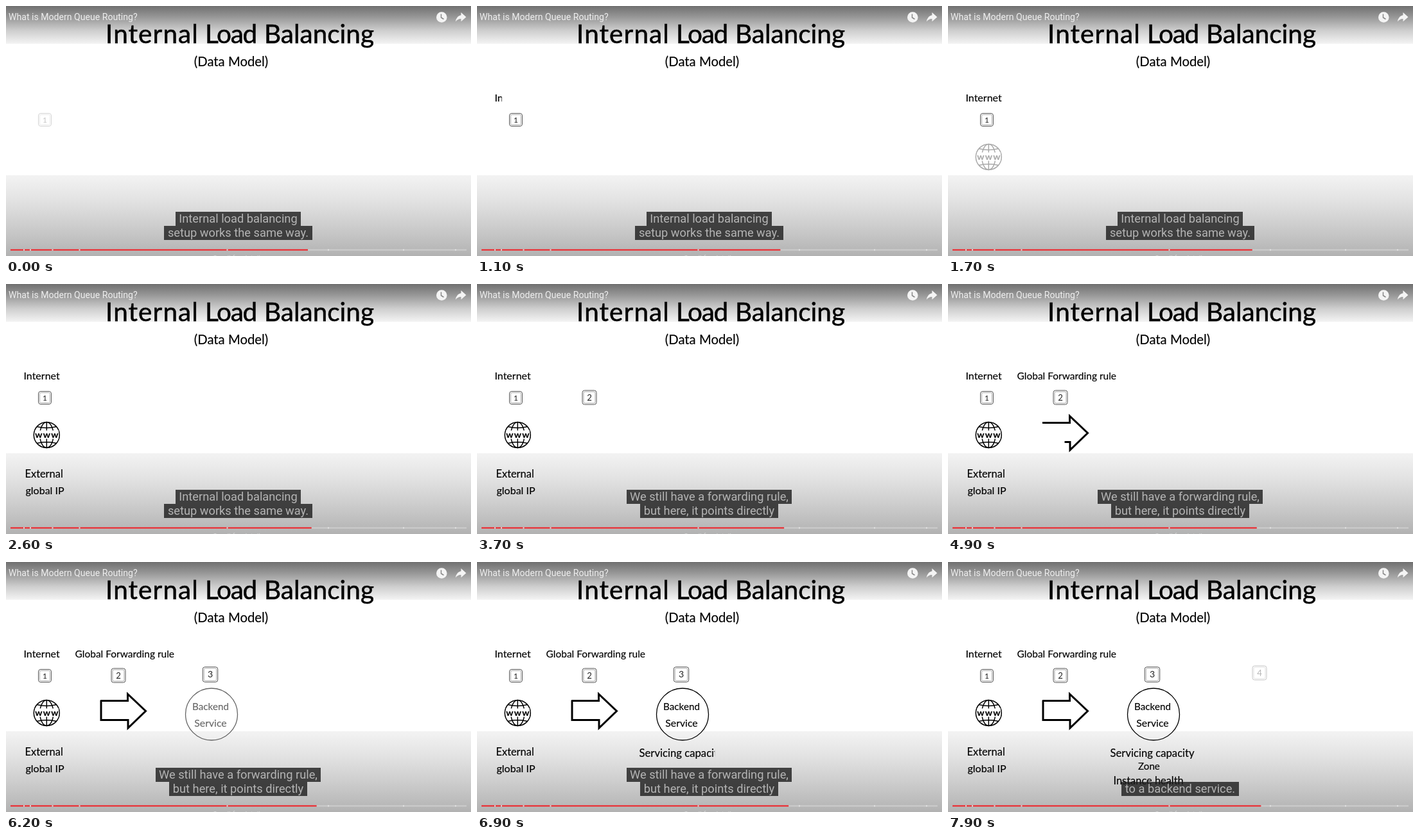
These frames come from a looping animation (724x390 px, 8 s). An HTML page:

```html
<!DOCTYPE html>
<html lang="en">
<head>
<meta charset="utf-8">
<title>Internal Load Balancing</title>
<style>
  html, body { margin: 0; width: 100%; height: 100%; overflow: hidden; background: #fff; }
  svg { position: absolute; left: 0; top: 0; }
  .hand { font-family: Lato, sans-serif; fill: #000; stroke: #000; stroke-width: .15; }
  .big { stroke-width: .5; }
  .ui { font-family: Roboto, sans-serif; }
  .line { fill: none; stroke: #000; }
  #caption {
    position: absolute; left: 0; top: 321px; width: 723px; height: 44px;
    display: flex; flex-direction: column; align-items: center; justify-content: flex-end;
    font: 18.25px/22px Roboto, sans-serif; color: #b4b4b4; white-space: pre;
  }
  #caption span { background: rgba(28, 28, 28, .8); padding: 0 5.5px; }
</style>
</head>
<body>
<svg id="stage" width="724" height="390" viewBox="0 0 724 390">
  <defs>
    <linearGradient id="top" x2="0" y2="1">
      <stop offset="0" stop-color="#707070"/>
      <stop offset=".3" stop-color="#989898"/>
      <stop offset=".65" stop-color="#cecece"/>
      <stop offset="1" stop-color="#f4f4f4"/>
    </linearGradient>
    <linearGradient id="bottom" x2="0" y2="1">
      <stop offset="0" stop-color="#f3f3f3"/>
      <stop offset=".3" stop-color="#e3e3e3"/>
      <stop offset=".6" stop-color="#cfcfcf"/>
      <stop offset="1" stop-color="#b2b2b2"/>
    </linearGradient>
  </defs>
  <rect width="724" height="59" fill="url(#top)"/>
  <rect y="264" width="724" height="126" fill="url(#bottom)"/>

  <g class="hand big" font-size="40.5">
    <text x="155" y="58" letter-spacing="1.1">Internal</text>
    <text x="310" y="58" letter-spacing="-1.3">Load</text>
    <text x="402" y="58">Balancing</text>
  </g>
  <text class="hand" x="350.5" y="94" font-size="20.3" text-anchor="middle">(Data Model)</text>

  <g id="board"></g>

  <g id="globe" class="line" stroke-width="1.5">
    <circle cx="63.3" cy="235.5" r="20"/>
    <ellipse cx="63.3" cy="235.5" rx="10.5" ry="20"/>
    <path d="M63.3 215.5v40M48 222.5q15.3 4 30.6 0M48 248.5q15.3 -4 30.6 0"/>
    <rect x="45" y="228.5" width="37" height="13" fill="#fff" stroke="none"/>
    <text class="hand" x="64" y="239.5" font-size="14" font-weight="700"
      letter-spacing="1.2" text-anchor="middle">www</text>
  </g>

  <path id="arrow" class="line" stroke-width="3" pathLength="1" stroke-dasharray="1 2"
    d="M147 216.5H189.5V206L217.5 232.5L190 259V246.5H148V216"/>

  <g id="service">
    <circle class="line" cx="320" cy="237.5" r="40.5" stroke-width="1.3"/>
    <g class="hand" text-anchor="middle">
      <text x="318.5" y="231" font-size="15.2">Backend</text>
      <text x="318.5" y="257" font-size="15.8">Service</text>
    </g>
  </g>

  <g class="ui">
    <text x="4" y="22" font-size="14.1" fill="#eee">What is Modern Queue Routing?</text>
    <text x="362" y="397" font-size="11" fill="#fff" opacity=".5" text-anchor="middle">Scroll for details</text>
  </g>
  <circle cx="678.3" cy="17.5" r="8.3" fill="#f4f4f4"/>
  <path d="M677.5 12.5v5.5l4 2.5" fill="none" stroke="#888" stroke-width="1.5"/>
  <path d="M708.5 10l8 7.2l-8 7v-4.2q-5.5 0 -8.5 4.5q1 -9 8.5 -10.3z" fill="#f4f4f4"/>

  <rect x="7" y="379.5" width="710" height="2" fill="#cdcdcd"/>
  <rect id="played" x="7" y="379.5" height="2" fill="#ee1c22"/>
  <g id="gaps" fill="#e4e4e4"></g>
</svg>
<div id="caption"></div>

<script>
const LOOP = 8000, STEP = 100;
const $ = id => document.getElementById(id);
const ramp = (t, from, to) => Math.min(1, Math.max(0, (t - from) / (to - from)));

function add(parent, tag, attrs, text = '') {
  const el = document.createElementNS('http://www.w3.org/2000/svg', tag);
  for (const k in attrs) el.setAttribute(k, attrs[k]);
  el.textContent = text;
  return parent.appendChild(el);
}

// text, x, baseline, size, writing start, writing end
const labels = [
  ['Internet', 27.5, 149, 16, 1000, 1500],
  ['External', 29.5, 302, 16.4, 1900, 2250],
  ['global IP', 30.5, 328, 16, 2250, 2600],
  ['Global Forwarding rule', 107.5, 149, 15.5, 3700, 4450],
  ['Servicing capacity', 252.5, 304, 16.7, 6480, 6950],
  ['Zone', 296, 324, 15.2, 6950, 7100],
  ['Instance health', 257.5, 347, 16.4, 7100, 7450]
].map(([text, x, y, size, from, to]) => ({
  from, to, el: add($('board'), 'text', { class: 'hand', x, y, 'font-size': size }, text)
}));

// centre x, centre y, side, fade start, fade end, least opacity
const keys = [
  [60.5, 177.5, 20, 400, 900, .25],
  [175, 177, 22, 3150, 3700, 0],
  [318, 175.5, 23.5, 5500, 5900, 0],
  [485, 173, 22, 7700, 8300, 0]
].map(([x, y, side, from, to, least], i) => {
  const el = add($('board'), 'g', {});
  const box = (s, rx, stroke) => add(el, 'rect',
    { x: x - s / 2, y: y - s / 2, width: s, height: s, rx, fill: '#fff', stroke });
  box(side, 3.5, '#555');
  box(side - 4, 2, '#aaa');
  add(el, 'text', { x, y: y + 4.6, 'font-family': 'Lato, sans-serif', 'font-size': side * .6,
    fill: '#222', 'text-anchor': 'middle' }, i + 1);
  return { el, from, to, least };
});

for (const x of [27, 37, 71.5, 113.5, 343.5, 501, 618, 699])
  add($('gaps'), 'rect', { x, y: 379.5, width: 2, height: 2 });

const captions = [
  [0, 'Internal load balancing', 'setup works the same way.'],
  [3300, 'We still have a forwarding rule,', 'but here, it points directly'],
  [7200, 'to a backend service.']
];
let shown;

function showCaption(t) {
  const now = captions.filter(c => c[0] <= t).pop();
  if (now === shown) return;
  shown = now;
  $('caption').replaceChildren(...now.slice(1).map(line => {
    const span = document.createElement('span');
    span.textContent = line;
    return span;
  }));
}

function draw(t) {
  for (const { el, from, to } of labels) {
    const p = ramp(t, from, to);
    el.style.visibility = p ? 'visible' : 'hidden';
    el.style.clipPath = p < 1 ? `inset(-4px ${100 - p * 100}% -4px -4px)` : 'none';
  }
  for (const { el, from, to, least } of keys)
    el.style.opacity = Math.max(least, ramp(t, from, to));
  $('globe').style.opacity = ramp(t, 1550, 2000);
  $('service').style.opacity = ramp(t, 5900, 6400);
  const p = ramp(t, 4500, 5070);
  $('arrow').style.visibility = p ? 'visible' : 'hidden';
  $('arrow').style.strokeDashoffset = 1 - p;
  $('played').setAttribute('width', 463 + t * .0022);
  showCaption(t);
}

const start = performance.now();
function tick() {
  const t = (performance.now() - start) % LOOP;
  draw(Math.floor(t / STEP) * STEP);
  requestAnimationFrame(tick);
}
tick();
</script>
</body>
</html>
```
